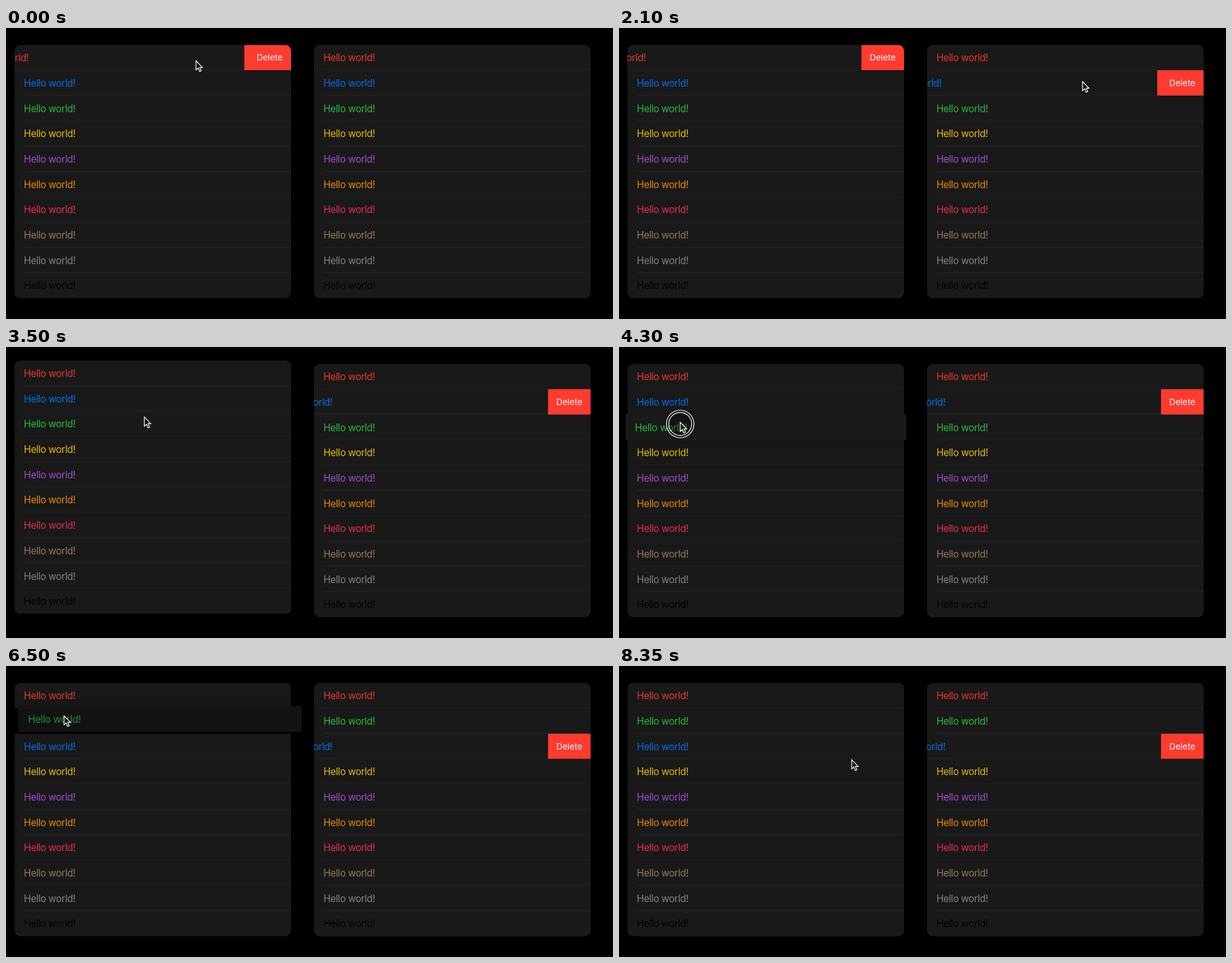
Write an HTML page with a canvas that moves like this. It is 952 by 456 pixels and loops after 8400 ms.

```html
<!DOCTYPE html>
<html lang="en">
<head>
<meta charset="utf-8">
<title>Swipe and reorder</title>
<style>
html, body { margin: 0; width: 100%; height: 100%; overflow: hidden; background: #000; }
canvas { display: block; }
</style>
</head>
<body>
<canvas id="stage" width="952" height="456"></canvas>
<script>
const ctx = document.getElementById('stage').getContext('2d');
const LOOP = 8400, MOVE = 450;
const LEFT = 13.3, RIGHT = 483.2, TOP = 26.5, ROW = 39.7, WIDTH = 433.7;
const OPEN = 66.8, OVERSHOOT = 6.5;
const CARD = '#191919', LINE = '#262626', RED = '#ff3b30';
const COLORS = [RED, '#007aff', '#28cd41', '#ffcc00', '#af52de',
  '#ff9500', '#ff2d55', '#a2845e', '#8e8e93', '#000'];
const BLUE = 1, GREEN = 2;

// Times at which the gestures begin
const SWIPE = 1600, SCROLL = 2735, PICK = 4120, DRAG = 5700, DROP = 6500;
const REST = { x: 365, y: 147 };
const MOVES = [
  { at: 500, ...REST },
  { at: SWIPE - MOVE, x: 800, y: 84 },
  { at: SWIPE, x: 727, y: 84 },
  { at: 2100, x: 260, y: 127 },
  { at: SCROLL, x: 260, y: 107 },
  { at: 3350, x: 96, y: 118 },
  { at: 4350, x: 89, y: 115.5 },
  { at: DRAG, x: 91, y: 78 },
  { at: 6850, ...REST }
];

// Smooth step from 0 to 1
function ease(t, from, length = MOVE) {
  const u = Math.min(1, Math.max(0, (t - from) / length));
  return u * u * (3 - 2 * u);
}

function box(x, y, w, h, color) {
  ctx.fillStyle = color;
  ctx.fillRect(x, y, w, h);
}

function label(text, x, y, size, color, spacing) {
  ctx.font = `${size}px Inter, "Liberation Sans", sans-serif`;
  ctx.letterSpacing = spacing + 'px';
  ctx.fillStyle = color;
  ctx.fillText(text, x, y);
}

function drawRow(x, y, id, swipe = 0, line = true) {
  const right = x + WIDTH, middle = y + ROW / 2;
  box(x, y, WIDTH, ROW + 0.3, CARD);
  if (line) {
    const start = Math.max(x, x + 15 - swipe);
    box(start, y + ROW - 1, right - start, 1, LINE);
  }
  ctx.save();
  ctx.globalAlpha *= 0.9;
  label('Hello world!', x + 14.7 - swipe, middle + 5.8, 15.2, COLORS[id], -0.38);
  ctx.restore();
  if (swipe > 0) {
    box(right - swipe, y, swipe, ROW, RED);
    label('Delete', right + 12.8 - Math.min(swipe, OPEN), middle + 5.1, 13.5, '#fff', 0);
  }
}

// swap: 0..1 progress of blue and green trading places
function drawList(x, y, swap, swipedId, swipe, hiddenId) {
  ctx.save();
  ctx.beginPath();
  ctx.roundRect(x, y, WIDTH, ROW * 10, 9);
  ctx.clip();
  if (hiddenId === undefined) box(x, y, WIDTH, ROW * 10, CARD);
  COLORS.forEach((_, id) => {
    if (id === hiddenId) return;
    const shift = id === BLUE ? swap : id === GREEN ? -swap : 0;
    drawRow(x, y + (id + shift) * ROW, id, id === swipedId ? swipe : 0, id < 9);
  });
  ctx.restore();
}

function drawLifted(t) {
  const drop = ease(t, DROP, 300), lift = ease(t, PICK, 320) - drop;
  const drag = ease(t, DRAG), loose = drag - drop;
  const scale = 1 + 0.025 * lift;
  ctx.save();
  ctx.globalAlpha = 1 - 0.26 * loose;
  ctx.translate(LEFT + WIDTH / 2 + 11.5 * loose,
    TOP + ROW * (2.5 - drag) - 3.3 * loose);
  ctx.scale(scale, scale);
  ctx.shadowColor = `rgba(0,0,0,${0.3 * lift})`;
  ctx.shadowBlur = 24;
  box(-WIDTH / 2, -ROW / 2, WIDTH, ROW, loose > 0 ? '#000' : CARD);
  ctx.shadowColor = 'transparent';
  drawRow(-WIDTH / 2, -ROW / 2, GREEN, 0, false);
  ctx.restore();
}

function drawRing(radius, fill) {
  ctx.beginPath();
  ctx.arc(0, 2.6, radius, 0, Math.PI * 2);
  ctx.fillStyle = fill;
  ctx.fill();
  ctx.stroke();
}

function drawPointer(t) {
  let x = 298, y = 51.5;
  for (const move of MOVES) {
    const k = ease(t, move.at);
    x += (move.x - x) * k;
    y += (move.y - y) * k;
  }
  const held = (from, to) => ease(t, from, 100) - ease(t, to, 80);
  const press = held(SWIPE - 50, 2010) + held(SCROLL - 120, 3270) + held(3800, DROP - 90);
  ctx.save();
  ctx.translate(x, y);
  ctx.strokeStyle = '#fff';
  if (press > 0) {
    ctx.globalAlpha = press;
    ctx.lineWidth = 1.15;
    drawRing(21.6, 'rgba(0,0,0,.25)');
    drawRing(18, 'transparent');
    ctx.globalAlpha = 1;
  }
  ctx.lineWidth = 1.2;
  ctx.fillStyle = '#101010';
  const arrow = new Path2D('M0 0V14.2L3.3 11.2L5.7 16.8L8.1 15.8L5.8 10.3H10.2Z');
  ctx.fill(arrow);
  ctx.stroke(arrow);
  ctx.restore();
}

function draw(t) {
  const lifted = t > PICK && t < DROP + 300;
  const leftSwipe = (OPEN + OVERSHOOT * (1 - ease(t, 0, 350))) * (1 - ease(t, 2630, 305));
  const opened = ease(t, SWIPE);
  const rightSwipe = OPEN * opened + OVERSHOOT * (opened - ease(t, SWIPE + MOVE, 300));
  const scroll = -7.7 * (ease(t, SCROLL) - ease(t, 3330));
  box(0, 0, 952, 456, '#000');
  drawList(LEFT, TOP + scroll, ease(t, 5920, 300), 0, leftSwipe, lifted ? GREEN : undefined);
  drawList(RIGHT, TOP, ease(t, 6150, 300), BLUE, rightSwipe);
  if (lifted) drawLifted(t);
  drawPointer(t);
}

const start = performance.now();
function tick() {
  draw((performance.now() - start) % LOOP);
  requestAnimationFrame(tick);
}
tick();
</script>
</body>
</html>
```
